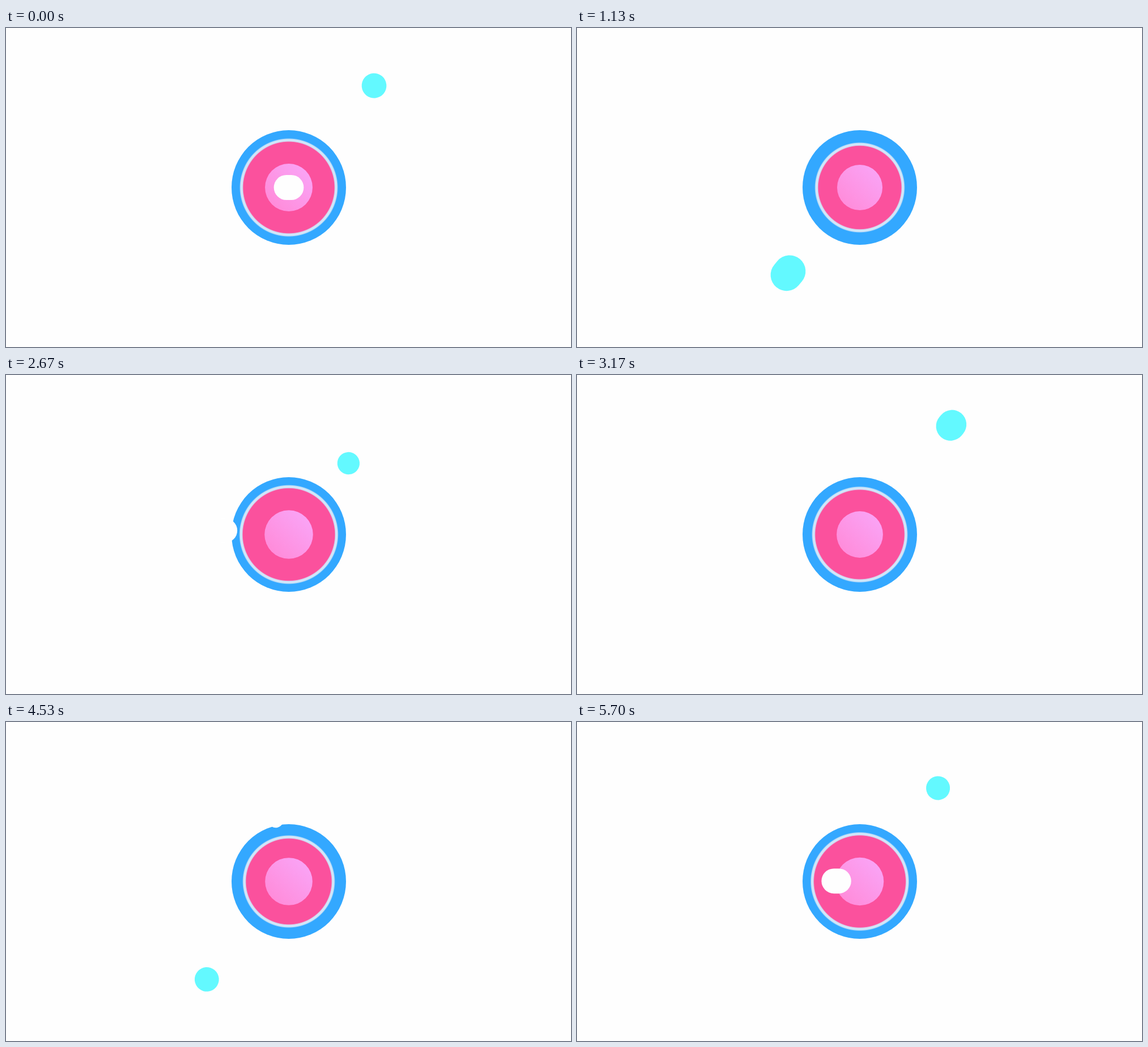
Animation, 997 px wide and 562 px high, one loop 5730 ms. Source, as an HTML page with a canvas:

```html
<!DOCTYPE html>
<html lang="en">
<head>
<meta charset="utf-8">
<title>Orbiting balls</title>
<style>
  html, body { margin: 0; width: 100%; height: 100%; overflow: hidden; background: #fefefe; }
  canvas { display: block; }
</style>
</head>
<body>
<canvas id="stage" width="997" height="562"></canvas>
<script>
const ctx = document.getElementById('stage').getContext('2d');
const LOOP = 5730, STEPS_PER_TURN = 72, FOCAL = 1000;
const CX = 499, CY = 281, CORE = 101;
const rad = deg => deg * Math.PI / 180;

// tilt: direction of travel in front; front: phase of the front crossing
const balls = [
  { color: '#63f9ff', orbit: 248, size: 22.8, tilt: 130, front: 100, bend: 0 },
  { color: '#fefefe', orbit: 193, size: 17.8, tilt: 0, front: 0, bend: 28 },
  { color: '#fefefe', orbit: 134, size: 12.3, tilt: 78, front: 255, bend: 0 }
];

// Steps come in groups of 15 per 600 ms; the first of each group holds for 70 ms
function stepAt(t) {
  const group = Math.floor(t / 600), rest = t % 600;
  const inner = rest < 70 ? 0 : 1 + Math.min(13, Math.floor((rest - 54) / 37.86));
  return group * 15 + inner;
}

function disc(r, fill) {
  ctx.fillStyle = fill;
  ctx.beginPath();
  ctx.arc(CX, CY, r, 0, 2 * Math.PI);
  ctx.fill();
}

function drawCore(phase) {
  const ring = 83.3 + 4 * Math.cos(rad(phase - 323));
  const inner = 41.5 + 1.8 * Math.cos(rad(phase - 285));

  const body = ctx.createRadialGradient(CX, CY, 0, CX, CY, CORE);
  const stop = (r, color) => body.addColorStop(r / CORE, color);
  stop(ring - 6.5, '#fb519d');
  stop(ring - 4.7, '#d0e6f9');
  stop(ring - 1.5, '#d0e6f9');
  stop(ring + 0.5, '#33a8ff');
  disc(CORE, body);

  const glow = ctx.createLinearGradient(CX - 30, CY + 30, CX + 30, CY - 30);
  glow.addColorStop(0, '#ff8cda');
  glow.addColorStop(1, '#faa3f5');
  disc(inner, glow);
}

function drawBall(ball, phase, inFront) {
  const turn = rad(phase - ball.front), depth = Math.cos(turn);
  if (depth > 0 !== inFront) return;
  const scale = FOCAL / (FOCAL - ball.orbit * depth);
  const along = ball.orbit * scale * Math.sin(turn);
  const r = ball.size * scale;
  const half = 0.195 * r * Math.max(0, depth) + 0.01;
  const ux = Math.cos(rad(ball.tilt)), uy = Math.sin(rad(ball.tilt));
  const x = CX + along * ux;
  const y = CY + along * uy - ball.bend * Math.sin(turn) ** 2;

  // A round-capped line is a circle, stretched when near the viewer
  ctx.strokeStyle = ball.color;
  ctx.lineCap = 'round';
  ctx.lineWidth = 2 * r;
  ctx.beginPath();
  ctx.moveTo(x - half * ux, y - half * uy);
  ctx.lineTo(x + half * ux, y + half * uy);
  ctx.stroke();
}

function draw() {
  const phase = stepAt(performance.now() % LOOP) / STEPS_PER_TURN * 360;
  ctx.fillStyle = '#fefefe';
  ctx.fillRect(0, 0, 997, 562);
  balls.forEach(ball => drawBall(ball, phase, false));
  drawCore(phase);
  balls.forEach(ball => drawBall(ball, phase, true));
  requestAnimationFrame(draw);
}
draw();
</script>
</body>
</html>
```
